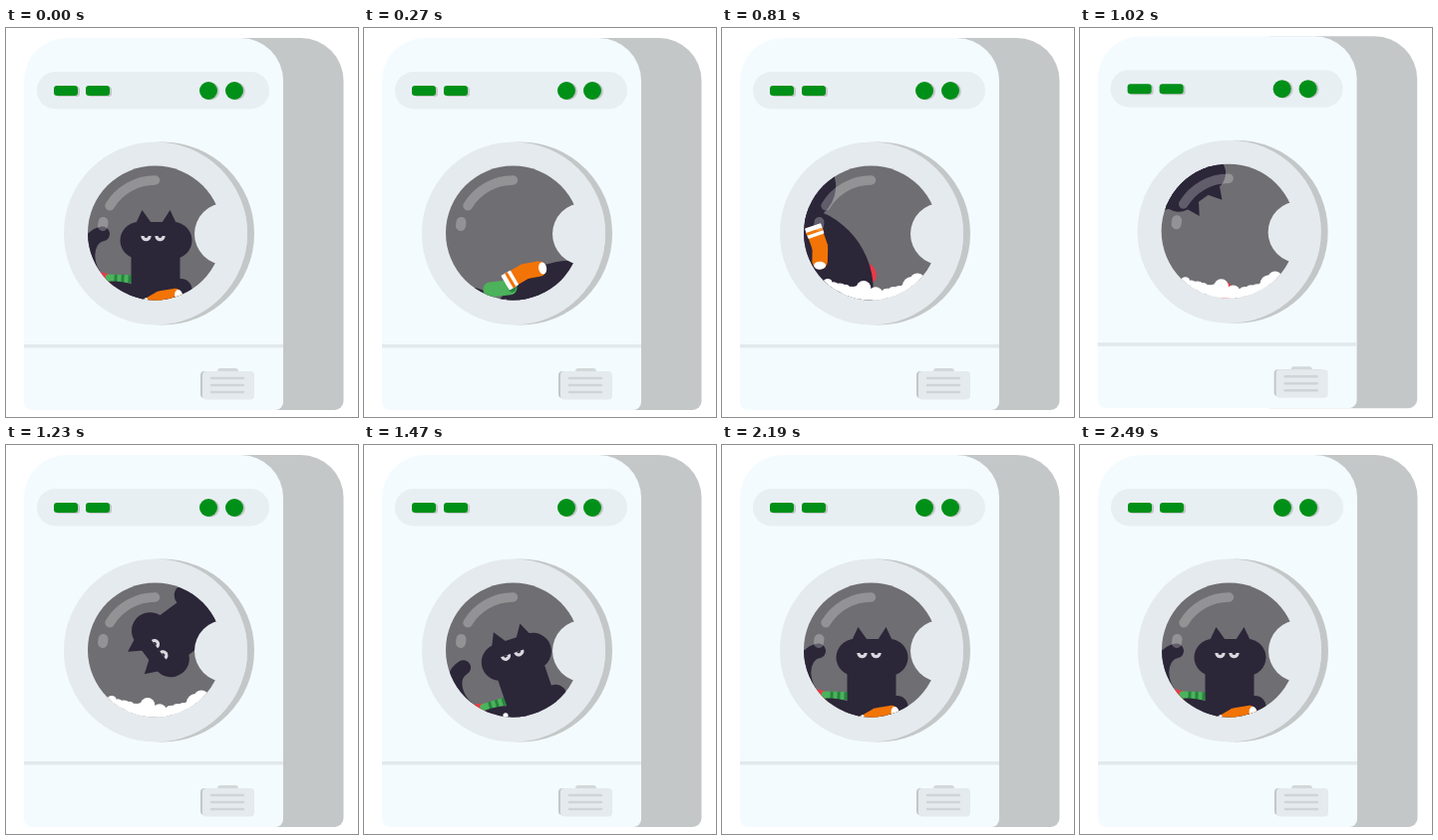
Write an HTML page with a canvas that moves like this. It is 353 px wide and 391 px high and loops after 2.52 s.

```html
<!DOCTYPE html>
<html lang="en">
<head>
<meta charset="utf-8">
<title>Cat in a washing machine</title>
<style>
html, body { margin: 0; width: 100%; height: 100%; overflow: hidden; background: #fff; }
canvas { display: block; }
</style>
</head>
<body>
<canvas id="stage" width="353" height="391"></canvas>
<script>
const ctx = document.getElementById('stage').getContext('2d');
const LOOP = 2520, STEP = 30;
const CX = 149.5, CY = 206, GLASS = 67.5;
const WHITE = '#f3fbff', PALE = '#e5eaee', SHADE = '#c4c7c8', GREEN = '#009018';
const DARK = '#2c2639', RED = '#f13745', ORANGE = '#f27406';

const rad = deg => deg * Math.PI / 180;
const lerp = (a, b, u) => a + (b - a) * u;
const ramp = (t, from, to) => Math.min(1, Math.max(0, (t - from) / (to - from)));
const ease = (t, from, to) => {
  const u = ramp(t, from, to);
  return u * u * (3 - 2 * u);
};

function seeded(seed) {
  return () => (seed = seed * 16807 % 2147483647) / 2147483647;
}

function fill(color, path) {
  ctx.fillStyle = color;
  ctx.beginPath();
  path();
  ctx.fill();
}

function disc(x, y, r, color) {
  fill(color, () => ctx.arc(x, y, r, 0, 7));
}

function ellipse(x, y, rx, ry, angle, color) {
  fill(color, () => ctx.ellipse(x, y, rx, ry, rad(angle), 0, 7));
}

function box(x, y, w, h, r, color) {
  fill(color, () => ctx.roundRect(x, y, w, h, r));
}

function poly(points, color) {
  fill(color, () => points.forEach(p => ctx.lineTo(...p)));
}

function line(color, width, path, cap = 'round') {
  ctx.strokeStyle = color;
  ctx.lineWidth = width;
  ctx.lineCap = cap;
  ctx.beginPath();
  path();
  ctx.stroke();
}

function at(x, y, angle, draw) {
  ctx.save();
  ctx.translate(x, y);
  ctx.rotate(rad(angle));
  draw();
  ctx.restore();
}

function clipDisc(x, y, r, draw) {
  ctx.save();
  ctx.beginPath();
  ctx.arc(x, y, r, 0, 7);
  ctx.clip();
  draw();
  ctx.restore();
}

function drawCabinet() {
  box(190, 10, 148.5, 374, [0, 43, 9, 0], SHADE);
  box(18, 10, 260, 374, [43, 43, 8, 8], WHITE);
  box(31, 44, 233, 37.5, 18.5, '#e8eff3');
  for (const x of [48, 80]) {
    box(x + 2, 59, 24, 10, 3, SHADE);
    box(x, 58, 24, 10, 3, GREEN);
  }
  for (const x of [203, 229]) {
    disc(x + 2, 63.5, 9, SHADE);
    disc(x, 63, 9, GREEN);
  }
  box(18, 318, 260, 3.5, 0, '#e2e9ed');
  box(195, 345, 50, 27, 4, SHADE);
  box(212, 342, 21, 8, 3, '#d3d8da');
  box(197, 345, 52, 28.5, 4, PALE);
  for (const y of [352, 359, 366]) {
    line('#cfd4d7', 2.4, () => { ctx.moveTo(206, y); ctx.lineTo(238, y); });
  }
}

// Everything in the drum frame is drawn around the drum's centre.

function drawTail() {
  line(DARK, 15, () => {
    ctx.moveTo(-53, 1);
    ctx.bezierCurveTo(-73, 5, -74, 40, -47, 57);
  });
}

function drawCat() {
  box(-24, 9, 49, 90, 0, DARK);
  disc(26, 57, 11, DARK);
  box(-35, -11, 72, 37, 18.5, DARK);
  poly([[-21, -6], [-13, -23], [-3, -9]], DARK);
  poly([[6, -9], [15, -23], [23, -6]], DARK);
  for (const x of [-9, 5]) {
    fill('#d9d8df', () => ctx.arc(x, 3, 5.2, 0, Math.PI));
    fill(DARK, () => ctx.arc(x, 3, 2, 0, Math.PI));
  }
}

// The curled-up back of the cat, pressed against the drum wall
function drawBack() {
  disc(12, 100, 85, DARK);
  disc(-75, 41, 36, DARK);
}

function drawRestingLaundry() {
  ellipse(-49, 46, 14, 5, 20, RED);
  at(-33, 46, 2, () => {
    box(-17, -4, 34, 8, 3.5, '#4cb25b');
    for (const x of [-8, -1, 6]) box(x, -4, 3, 8, 0, '#278541');
  });
  ellipse(-35, 62, 28, 13, 8, DARK);
}

function drawGreenSock(x, y, angle) {
  at(x, y, angle, () => {
    box(-17, -7.5, 34, 15, 7, '#4cb25b');
    ellipse(12, -1, 4.5, 6, 0, '#278541');
  });
}

function drawOrangeSock(x, y, angle, bend) {
  at(x, y, angle, () => {
    line(ORANGE, 16, () => { ctx.moveTo(-13, 0); ctx.lineTo(1, 0); }, 'butt');
    at(0, 0, bend, () => {
      line(ORANGE, 15.5, () => { ctx.moveTo(0, 0); ctx.lineTo(14, 0); });
      ellipse(18, 0, 4, 6, 0, '#fff');
    });
    box(-23, -8.5, 11, 17, 1, '#fff');
    box(-18.5, -8.5, 3, 17, 0, ORANGE);
  });
}

// The sock lands on the cat's head, then slides off to the floor.
function drawFallingSock(t) {
  const fall = ramp(t, 1640, 1860) ** 2, slide = ease(t, 1890, 2160);
  drawOrangeSock(lerp(149, 156, slide), lerp(105, 193, fall) + 79 * slide,
    lerp(120, 155, fall) + 175 * slide, lerp(-30, 20, slide));
}

function drawFoam(amount) {
  if (amount < .01) return;
  const random = seeded(77);
  for (let x = 106; x <= 196; x += 6) {
    const floor = CY + Math.sqrt(GLASS ** 2 - (x - CX) ** 2);
    const y = floor - 1 - 11 * random() ** 2, r = 4 + 5 * random();
    disc(x, y + (1 - amount) * 12, r * Math.sqrt(amount), '#fff');
  }
}

function drawLoad(t) {
  // Swing back a little, then one accelerating turn forward
  const angle = -40 * ease(t, 30, 480) + 400 * ramp(t, 480, 1510) ** 1.2;
  const sunk = ease(t, 60, 420) * (1 - ease(t, 840, 1200));
  const tucked = ease(t, 60, 300) * (1 - ease(t, 1230, 1470));
  const sliding = ease(t, 480, 810);

  if (sunk > 0) {
    ellipse(lerp(104, 146, sliding), lerp(253, 246, sliding) + 40 * (1 - sunk),
      lerp(30, 11, sliding), 8, lerp(37, 60, sliding), RED);
  }
  at(CX, CY, angle, () => {
    at(-30 * tucked, 30 * tucked, 0, () => {
      drawTail();
      drawRestingLaundry();
    });
    at(0, 105 * sunk, 0, drawCat);
    at(0, 70 * (1 - sunk), 0, drawBack);
    if (sunk > 0) drawGreenSock(-33, 30 + 45 * (1 - sunk) + 40 * sliding, 16);
    if (t < 1200) {
      const lift = ease(t, 60, 450);
      drawOrangeSock(lerp(6, -11, lift),
        lerp(66, 20, lift) + 32 * sliding + 60 * ease(t, 840, 1140), lerp(-30, 9, lift), 20);
    }
  });
  if (t > 1600) drawFallingSock(t);
  drawFoam(ease(t, 240, 720) * (1 - ease(t, 1260, 1530)));
}

function drawDoor(t) {
  disc(157, 206.5, 92, SHADE);
  disc(150, 206.5, 92, PALE);
  clipDisc(CX, CY, GLASS, () => {
    box(80, 137, 140, 140, 0, '#6f6e72');
    drawLoad(t);
    const glare = 'rgba(255,255,255,.25)';
    line(glare, 9.5, () => ctx.arc(CX, CY, 53, rad(211), rad(270)));
    line(glare, 10, () => { ctx.moveTo(97, 199); ctx.lineTo(97.5, 195); });
  });
  clipDisc(150, 206.5, 92, () => disc(220, 207, 31, PALE));
}

function render(t) {
  const shaking = t > 60 && t < 1800 && (t / STEP) % 2 === 0;
  const lift = shaking ? lerp(1.8, .8, ramp(t, 1600, 1650)) : 0;
  ctx.fillStyle = '#fff';
  ctx.fillRect(0, 0, 353, 391);
  ctx.save();
  ctx.translate(-lift * .2, -lift);
  drawCabinet();
  drawDoor(t);
  ctx.restore();
}

const start = performance.now();
function tick() {
  const t = (performance.now() - start) % LOOP;
  render(Math.floor(t / STEP) * STEP);
  requestAnimationFrame(tick);
}
tick();
</script>
</body>
</html>
```
